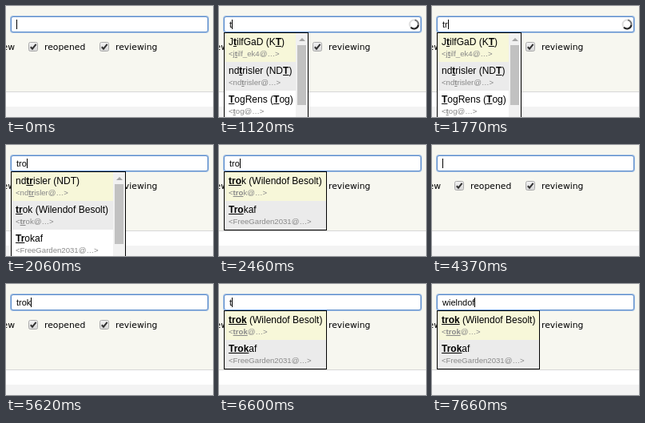
Write an HTML page that moves like this. It is 259 by 139 pixels and loops after 8 s.

```html
<!DOCTYPE html>
<html lang="en">
<meta charset="utf-8">
<title>Reporter autocomplete</title>
<style>
html, body { margin: 0; width: 100%; height: 100%; overflow: hidden; background: #f7f7f0; }
body { position: relative; font: 10.8px/14px "DejaVu Sans", sans-serif; color: #000; }
body > * { position: absolute; box-sizing: border-box; white-space: pre; }
#page { left: 0; top: 107px; width: 100%; height: 19px; background: #fff; border-top: 1px solid #d7d7d7; }
#foot { left: 0; top: 126px; width: 100%; height: 13px; background: #f3f3f3; }
#field { left: 6px; top: 13px; width: 247px; height: 20px; background: #fff; border: 1px solid #5b8ccb;
  border-radius: 3px; box-shadow: 0 0 0 1px #a5c1e4; }
#typed { left: 13px; top: 17px; font: 11px/12px "Liberation Sans", Arial, sans-serif; }
#caret { top: 17px; width: 1px; height: 12px; background: #000; }
.box { top: 45px; }
.label { top: 45px; }
#popup { left: 6px; top: 33px; border: 1px solid #000; background: #fff; overflow: hidden;
  font: 12px/14px "Liberation Sans", Arial, sans-serif; }
.row { height: 36px; padding: 4px 5px; box-sizing: border-box; }
.row:nth-child(even) { background: #ebebeb; }
.row:first-child { background: #f7f7d9; }
.row b { text-decoration: underline; }
.mail { font-size: 9.6px; color: #888; }
.bar { position: absolute; right: 0; top: 0; width: 15px; height: 100%; background: #f1f1f1; }
.bar::before { content: ""; position: absolute; left: 4px; top: 6px; border: 4px solid transparent;
  border-top: 0; border-bottom-color: #a3a3a3; }
.bar::after { content: ""; position: absolute; left: 2px; top: 15px; width: 11px; height: 75px; background: #c1c1c1; }
</style>
<body>
<div id="page"></div>
<div id="foot"></div>
<div class="label" style="right:248px">new</div>
<svg class="box" style="left:28px" width="12" height="12"><use href="#check"/></svg>
<div class="label" style="left:48px">reopened</div>
<svg class="box" style="left:117px" width="12" height="12"><use href="#check"/></svg>
<div class="label" style="left:137px">reviewing</div>
<div id="field"></div>
<div id="typed"></div>
<div id="caret"></div>
<svg id="spin" style="left:237px;top:16px" width="14" height="14" viewBox="-7 -7 14 14" fill="none" stroke-width="2">
  <circle r="5.5" stroke="#ddd"/>
  <path d="M1-5.4A5.5 5.5 0 0 1 4.8 2.7" stroke="#777"/>
  <path d="M5.4 1A5.5 5.5 0 0 1-4 3.8" stroke="#222"/>
</svg>
<div id="popup"></div>
<svg width="0" height="0"><defs>
  <linearGradient id="shade" x2="0" y2="1"><stop stop-color="#f4f4f4"/><stop offset="1" stop-color="#d6d6d6"/></linearGradient>
  <g id="check">
    <rect x=".5" y=".5" width="11" height="11" rx="2" fill="url(#shade)" stroke="#aaa"/>
    <path d="M2.8 6.2L5 8.6L9.6 2.8" fill="none" stroke="#333" stroke-width="2"/>
  </g>
</defs></svg>
<script>
const el = id => document.getElementById(id);

const users = {
  jt: ["JtilfGaD (KT)", "jtilf_ek4"],
  nd: ["ndtrisler (NDT)", "ndtrisler"],
  tog: ["TogRens (Tog)", "tog"],
  trok: ["trok (Wilendof Besolt)", "trok"],
  cap: ["Trokaf", "FreeGarden2031"]
};

// Popup states: search term, rows, width, height, scrollbar
const popups = {
  t: ["t", ["jt", "nd", "tog"], 106, 120, true],
  tr: ["tr", ["nd", "trok", "cap"], 144, 120, true],
  tro: ["tro", ["trok", "cap"], 129, 74, false],
  trok: ["trok", ["trok", "cap"], 129, 74, false]
};

// [start ms, typed text, popup, caret hidden, spinner]
const steps = [
  [0, ""], [200, "", "", 1], [680, "t"],
  [1080, "t", "", 0, 1], [1120, "t", "t", 0, 1], [1160, "t", "t"],
  [1370, "tr", "t"], [1770, "tr", "t", 0, 1], [1810, "tr", "tr"],
  [2060, "tro", "tr"], [2460, "tro", "tro"],
  [2760, "trok", "tro"], [3160, "trok", "trok"],
  [3560, "tro", "trok"], [3690, "tr", "trok"], [3840, "t", "trok"], [3970, "", "trok"],
  [4370, ""], [4970, "", "", 1],
  [5350, "t"], [5440, "tr"], [5530, "tro"], [5620, "trok"], [6030, "trok", "trok"],
  [6360, "tro", "trok"], [6480, "tr", "trok"], [6600, "t", "trok"], [6730, "", "trok"],
  [7020, "w", "trok"], [7170, "wi", "trok"], [7250, "wie", "trok"],
  [7400, "wiel", "trok"], [7490, "wieln", "trok"], [7570, "wielnd", "trok"], [7660, "wielndof", "trok"]
];

const mark = (text, term) => text.replace(new RegExp(term, "gi"), "<b>$&</b>");

function popupHtml([term, ids, , , scroll]) {
  const rows = ids.map(id => {
    const [name, mail] = users[id];
    return `<div class="row">${mark(name, term)}<br><span class="mail">&lt;${mark(mail, term)}@…&gt;</span></div>`;
  });
  return rows.join("") + (scroll ? '<div class="bar"></div>' : "");
}

let shown;
function show(step) {
  if (step === shown) return;
  shown = step;
  const [, text, key, noCaret, spin] = step;
  el("typed").textContent = text;
  el("caret").style.left = 13 + Math.round(el("typed").getBoundingClientRect().width) + "px";
  el("caret").hidden = !!noCaret;
  el("spin").style.display = spin ? "" : "none";
  const popup = popups[key];
  el("popup").hidden = !popup;
  if (!popup) return;
  el("popup").innerHTML = popupHtml(popup);
  el("popup").style.width = popup[2] + "px";
  el("popup").style.height = popup[3] + "px";
}

function frame() {
  const t = performance.now() % 8000;
  show(steps.findLast(s => s[0] <= t));
  requestAnimationFrame(frame);
}
frame();
</script>
</body>
</html>
```
